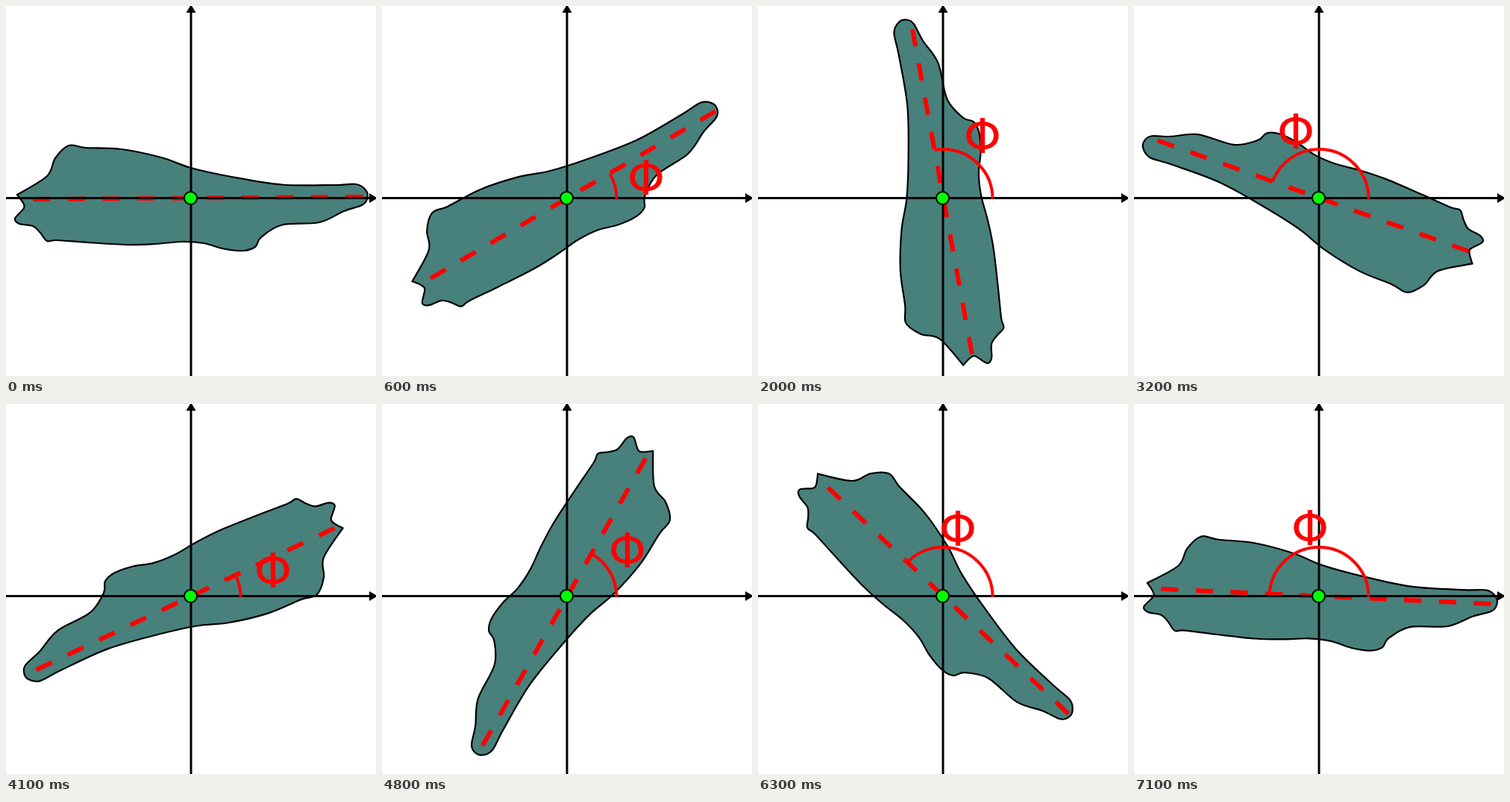
An HTML page with a canvas that plays this animation: 496x496 px, repeating every 7200 ms.

```html
<!DOCTYPE html>
<html>
<head>
<meta charset="utf-8">
<style>
  html, body { margin: 0; overflow: hidden; background: #fff; }
  canvas { display: block; }
</style>
</head>
<body>
<canvas id="stage" width="496" height="496"></canvas>
<script>
const ctx = document.getElementById('stage').getContext('2d');
const STEP = 100, STEPS = 72, RAD = Math.PI / 180;
const CX = 248, CY = 257.5;

// Outline at angle zero, starting at the sharp tail corner
const MID = [242.25, 253.75];
const OUTLINE = [
  [15, 253], [55, 228], [66, 204], [84, 187], [107, 190], [155, 192], [208, 203],
  [248, 217], [300, 228.5], [370, 239.5], [440, 240], [470, 239], [483, 248],
  [484, 259], [477, 267], [453, 275], [420, 290], [370, 293.5], [342, 310],
  [334, 323], [318, 328], [292, 325.5], [265, 318], [235, 316], [200, 319],
  [163, 320], [110, 317], [68, 314], [55, 315], [46, 304], [36, 295], [18, 292],
  [12, 285], [24, 271], [23, 264], [15, 253]
];

// step, angle, middle x, middle y, lengthwise scale
const POSES = [
  [0, 0, 242.25, 253.75, 1], [6, 30, 237.75, 256, 1], [8, 40, 236.3, 258, 1],
  [16, 80, 237, 256.3, 1], [20, 100, 236.5, 257.5, 1], [24, 120, 239.5, 262.3, 1],
  [32, 160, 240.25, 267, 1], [41, 205, 245.25, 261.75, 1], [48, 240, 249, 259.3, 1],
  [55, 275, 246.75, 257.75, 0.983], [64, 321.5, 243.3, 249.8, 1], [71, 357, 244.75, 252.5, 1]
];

// step, label x, label y
const LABELS = [
  [0, 364, 246], [6, 354, 230], [20, 301, 174], [32, 217, 168], [35, 205, 166],
  [37, 362, 240], [41, 358, 223], [55, 300, 168], [71, 236, 166]
];

function sample(keys, step) {
  const next = Math.max(1, keys.findIndex(key => key[0] >= step));
  const a = keys[next - 1], b = keys[next];
  const k = (step - a[0]) / (b[0] - a[0]);
  return a.slice(1).map((v, i) => v + (b[i + 1] - v) * k);
}

function smoothPath(points) {
  const path = new Path2D(), last = points.length - 1;
  const at = i => points[Math.min(last, Math.max(0, i))];
  path.moveTo(...points[0]);
  for (let i = 0; i < last; i++) {
    const [p, a, b, q] = [at(i - 1), at(i), at(i + 1), at(i + 2)];
    path.bezierCurveTo(
      a[0] + (b[0] - p[0]) / 6, a[1] + (b[1] - p[1]) / 6,
      b[0] - (q[0] - a[0]) / 6, b[1] - (q[1] - a[1]) / 6, ...b);
  }
  path.closePath();
  return path;
}
const body = smoothPath(OUTLINE.map(([x, y]) => [x - MID[0], y - MID[1]]));

function pen(color, width) {
  ctx.strokeStyle = color;
  ctx.lineWidth = width;
}

function line(x1, y1, x2, y2) {
  ctx.beginPath();
  ctx.moveTo(x1, y1);
  ctx.lineTo(x2, y2);
  ctx.stroke();
}

function axis(x, y, angle, back) {
  ctx.save();
  ctx.translate(x, y);
  ctx.rotate(angle);
  pen('#000', 3);
  line(-back, 0, -8, 0);
  ctx.fillStyle = '#000';
  ctx.fill(new Path2D('M0 0L-11 -6.5V6.5Z'));
  ctx.restore();
}

function draw(step) {
  const [angle, x, y, scale] = sample(POSES, step);
  ctx.fillStyle = '#fff';
  ctx.fillRect(0, 0, 496, 496);

  ctx.save();
  ctx.translate(x, y);
  ctx.rotate(-angle * RAD);
  ctx.scale(scale, 1);
  ctx.fillStyle = '#48807c';
  ctx.fill(body);
  pen('#000', 2.2);
  ctx.stroke(body);
  ctx.restore();

  ctx.save();
  ctx.translate(CX + 0.5, CY);
  ctx.rotate(-(angle + 0.4) * RAD);
  ctx.setLineDash([23.3, 23.3]);
  pen('#f00', 6);
  line(-212.5, 0, 231, 0);
  ctx.restore();

  axis(498, CY, 0, 498);
  axis(CX, -2, -Math.PI / 2, 498);

  const phi = angle % 180;
  if (phi > 0) {
    pen('#f00', 4);
    ctx.beginPath();
    ctx.arc(CX, CY + 1, 66.5, 0, -phi * RAD, true);
    ctx.stroke();
    const [lx, ly] = sample(LABELS, step);
    ctx.fillStyle = '#f00';
    ctx.font = '64px "DejaVu Sans", sans-serif';
    ctx.textAlign = 'center';
    ctx.fillText('Φ', lx, ly + 23.3);
  }

  ctx.beginPath();
  ctx.arc(CX - 0.5, CY, 8.5, 0, 2 * Math.PI);
  ctx.fillStyle = '#0f0';
  ctx.fill();
  pen('#000', 2);
  ctx.stroke();
}

const start = performance.now();
function tick() {
  const elapsed = performance.now() - start;
  draw(Math.floor(elapsed / STEP) % STEPS);
  requestAnimationFrame(tick);
}
tick();
</script>
</body>
</html>
```
